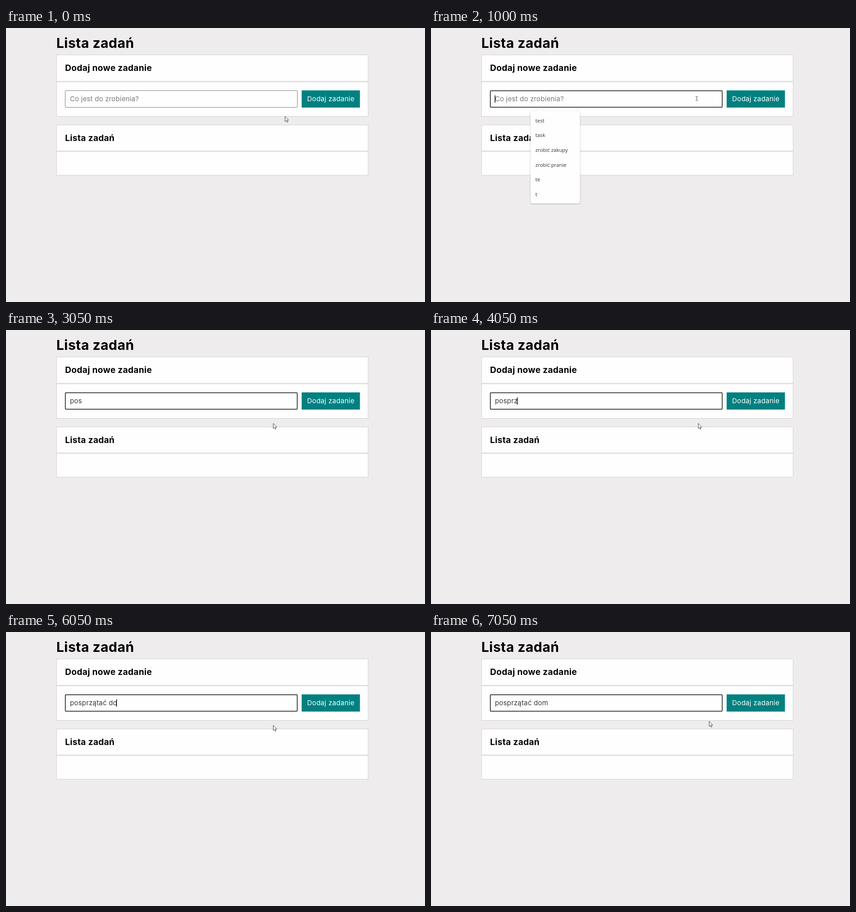
Write an HTML page that moves like this. It is 924 by 606 pixels and loops after 8000 ms.

```html
<!DOCTYPE html>
<html lang="pl">
<head>
<meta charset="utf-8">
<title>Lista zadań</title>
<style>
  html, body { margin: 0; width: 100%; height: 100%; overflow: hidden; background: #eeecec; }
  svg { display: block; width: 924px; height: 606px; font: 400 15px Inter, "Open Sans", sans-serif; font-optical-sizing: none; }
  .panel { fill: #fefefe; stroke: #d2d0d0; }
  .divider { fill: #dcdcdc; }
  .title { font-size: 30px; font-weight: 700; letter-spacing: .4px; }
  .heading { font-size: 19px; font-weight: 700; letter-spacing: .3px; }
  .button { fill: #008080; }
  #field { fill: #fefefe; }
  #entry { letter-spacing: .15px; }
  .label { fill: #fff; letter-spacing: .28px; }
  #menu text { font: 11.3px "Open Sans", "Noto Sans", sans-serif; fill: #333; }
  #bubble { fill: #fefefe; filter: drop-shadow(0 1px 1.5px rgba(0, 0, 0, .28)); }
  #arrow { fill: #fff; stroke: #333; stroke-width: .9; }
  #beam { fill: none; stroke: #444; }
</style>
</head>
<body>
<svg viewBox="0 0 924 606">
  <text class="title" x="111" y="44">Lista zadań</text>

  <rect class="panel" x="111.5" y="59.5" width="687" height="136"/>
  <rect class="divider" x="112" y="117.2" width="687" height="2.6"/>
  <text class="heading" x="130.3" y="95">Dodaj nowe zadanie</text>
  <rect id="field" rx="1.5"/>
  <text id="entry" x="141" y="162"></text>
  <rect id="caret" y="149" width="1.5" height="16"/>
  <rect class="button" x="652" y="138" width="128.5" height="38"/>
  <text class="label" x="664" y="162">Dodaj zadanie</text>

  <rect class="panel" x="111.5" y="214.5" width="687" height="111"/>
  <rect class="divider" x="112" y="271.2" width="687" height="2.6"/>
  <text class="heading" x="130.3" y="249.5">Lista zadań</text>

  <g id="menu">
    <path id="bubble" d="M223.5 183.5H231l8-6.5 8 6.5h77.5a4 4 0 0 1 4 4V384a4 4 0 0 1-4 4h-101a4 4 0 0 1-4-4V187.5a4 4 0 0 1 4-4z"/>
  </g>
  <path id="arrow" d="M0 0V11.4L2.6 9 4.4 13 6.2 12.2 4.4 8.3H7.9Z"/>
  <path id="beam" d="M583.5 151.5h1.5l1 1 1-1h1.5M586 152v8M583.5 160.5h1.5l1-1 1 1h1.5"/>
</svg>
<script>
const DURATION = 8000;
const el = id => document.getElementById(id);
const setAttrs = (node, attrs) => Object.entries(attrs).forEach(([k, v]) => node.setAttribute(k, v));
const show = (node, visible) => node.setAttribute("visibility", visible ? "visible" : "hidden");

const [field, entry, caret, menu, arrow, beam] =
  ["field", "entry", "caret", "menu", "arrow", "beam"].map(el);

["test", "task", "zrobić zakupy", "zrobić pranie", "te", "t"].forEach((word, i) => {
  const item = document.createElementNS("http://www.w3.org/2000/svg", "text");
  setAttrs(item, { x: 230.3, y: 208.7 + 32.6 * i });
  item.textContent = word;
  menu.append(item);
});

// A missing caret is in its blink-off phase; a missing pointer shows the text beam.
const steps = [
  { at: 0, text: "", pointer: [615.4, 195.6] },
  { at: 1000, text: "", focus: true, caret: 140.5, menu: 1 },
  { at: 2030, text: "p", focus: true, caret: 150, menu: .93, pointer: [589.4, 206.6] },
  { at: 3050, text: "pos", focus: true, pointer: [589.4, 206.6] },
  { at: 4050, text: "posprz", focus: true, caret: 189.5, pointer: [589.4, 206.6] },
  { at: 5030, text: "posprzątać", focus: true, caret: 220.2, pointer: [589.4, 206.6] },
  { at: 6050, text: "posprzątać do", focus: true, caret: 243, pointer: [589.4, 206.6] },
  { at: 7050, text: "posprzątać dom", focus: true, pointer: [613.4, 197.6] }
];

function render(step) {
  const line = step.focus ? 1.5 : 1;
  setAttrs(field, {
    x: 130 + line / 2, y: 138 + line / 2, width: 513 - line, height: 38 - line,
    stroke: step.focus ? "#101010" : "#7c7c7c", "stroke-width": line
  });

  entry.textContent = step.text || "Co jest do zrobienia?";
  entry.setAttribute("fill", step.text ? "#3a3a3a" : "#7a7a7a");
  show(caret, step.caret);
  if (step.caret) caret.setAttribute("x", step.caret);

  show(menu, step.menu);
  if (step.menu) {
    const scale = step.menu < 1 ? .994 : 1;
    setAttrs(menu, {
      opacity: step.menu,
      transform: `translate(274 286) scale(${scale}) translate(-274 -286)`
    });
  }

  show(arrow, step.pointer);
  show(beam, !step.pointer);
  if (step.pointer) arrow.setAttribute("transform", `translate(${step.pointer})`);
}

let current;
function tick() {
  const time = performance.now() % DURATION;
  const step = steps.findLast(s => s.at <= time);
  if (step !== current) render(current = step);
  requestAnimationFrame(tick);
}
tick();
</script>
</body>
</html>
```
